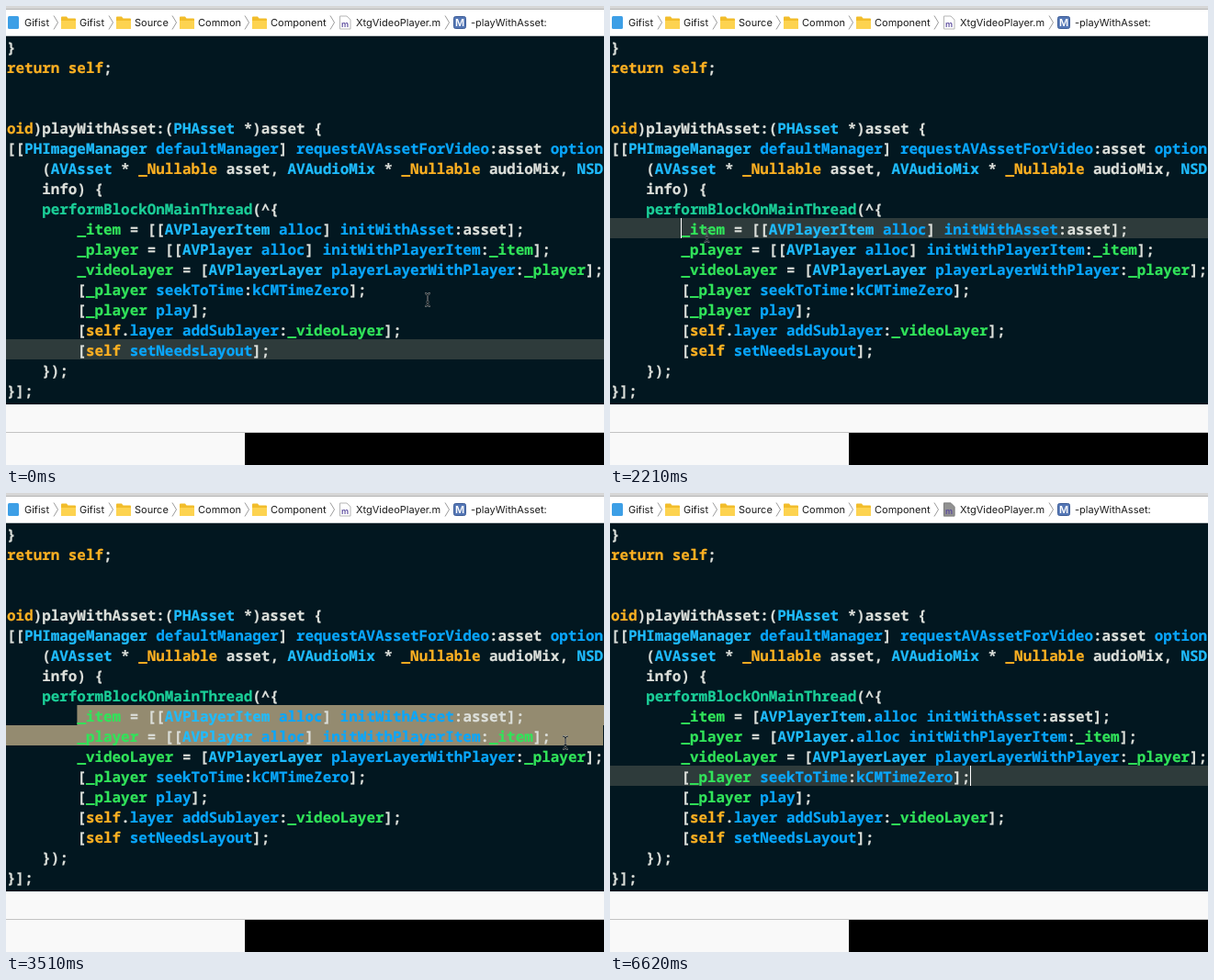
Animation, 651 px wide and 500 px high, one loop 7.07 s. Source, as an HTML page:

```html
<!DOCTYPE html>
<html lang="en">
<head>
<meta charset="utf-8">
<title>Code editor</title>
<style>
  html, body { margin: 0; width: 100%; height: 100%; overflow: hidden; background: #021720; }
  svg { display: block; width: 651px; height: 500px; }
  text { white-space: pre; text-rendering: geometricPrecision; }
  #code text { font: 600 15.917px "Noto Sans Mono", "DejaVu Sans Mono", monospace; stroke-width: .2px; }
  #path text { font: 11px Inter, "Liberation Sans", sans-serif; fill: #1c1c1c; }
  #path .glyph { font-weight: 600; text-anchor: middle; }
  .plain { fill: #dcdfda; stroke: #dcdfda; }
  .key { fill: #fdb022; stroke: #fdb022; }
  .type { fill: #1fbcff; stroke: #1fbcff; }
  .call { fill: #09a7fe; stroke: #09a7fe; }
  .ivar { fill: #31e45a; stroke: #31e45a; }
  .func { fill: #1bcf98; stroke: #1bcf98; }
</style>
</head>
<body>
<svg viewBox="0 0 651 500" xmlns="http://www.w3.org/2000/svg">
  <defs>
    <g id="folder">
      <path d="M0 13V1.5Q0 .5 1 .5H6L7.5 2.5H15Q16 2.5 16 3.5V13Q16 14 15 14H1Q0 14 0 13Z" fill="#f2bd2b"/>
      <path d="M0 5H16V13Q16 14 15 14H1Q0 14 0 13Z" fill="#fdd350"/>
    </g>
    <path id="chevron" d="M0 0L4.500 7.500L0 15" fill="none" stroke="#9b9b9b"/>
    <path id="sheet" d="M.5 .5H8L12 4.500V14.500H.5Z"/>
    <path id="beam" d="M-3 -7Q0 -7 0 -4.500Q0 -7 3 -7M0 -4.500V4.500M-3 7Q0 7 0 4.500Q0 7 3 7M-1.500 2.500H1.500" fill="none"/>
  </defs>

  <rect width="651" height="500" fill="#021720"/>
  <rect id="row" width="651" height="22" fill="#2e3b3b"/>
  <g id="selection" fill="#948b70"></g>
  <g id="code"></g>
  <rect id="caret" width="1" height="22" fill="#fff"/>

  <g id="path">
    <rect width="651" height="33" fill="#fff"/>
    <rect width="651" height="3" fill="#d6d6d6"/>
    <rect y="3" width="651" height="1" fill="#b4b4b4"/>
    <rect y="32" width="651" height="1" fill="#c4c8ca"/>
    <rect x="2" y="11" width="12" height="14" rx="1.500" fill="#3d9fe6"/>
    <use href="#sheet" x="363" y="10.500" fill="#fff" stroke="#b5b5b5"/>
    <use id="dim" href="#sheet" x="363" y="10.500" fill="#929292" stroke="#7d7d7d"/>
    <text class="glyph" x="369" y="22.500" style="fill:#5a4a9c;font-size:9px">m</text>
    <rect x="487.500" y="11.500" width="13" height="13" rx="2" fill="#5577b5" stroke="#3c5c98"/>
    <text class="glyph" x="494" y="22" style="fill:#fff">M</text>
  </g>

  <rect y="434" width="651" height="31" fill="#f9f9f9"/>
  <rect y="464" width="651" height="1" fill="#c3c3c3"/>
  <rect y="465" width="260" height="35" fill="#f9f9f9"/>
  <rect x="260" y="465" width="391" height="35" fill="#000"/>

  <g id="mouse">
    <use href="#beam" stroke="#b4baba" stroke-width="1.800" opacity=".8"/>
    <use href="#beam" stroke="#0a0f12" stroke-width=".9"/>
  </g>
</svg>
<script>
const LOOP = 7070, WIDTH = 651, COL = 9.55, ROW = 22, LEFT = 1, TOP = 33;
const $ = id => document.getElementById(id);
const rowY = row => TOP + row * ROW;
const colX = col => LEFT + col * COL;

function add(parent, tag, attrs, text = '') {
  const el = document.createElementNS('http://www.w3.org/2000/svg', tag);
  for (const k in attrs) el.setAttribute(k, attrs[k]);
  el.textContent = text;
  return parent.appendChild(el);
}

// Syntax colouring
const PLAIN = /^(playWithAsset|asset|audioMix|info)$/;
function kind(word) {
  if (/^(oid|return|self|_Nullable)$/.test(word)) return 'key';
  if (/^_/.test(word)) return 'ivar';
  if (/^(PH|AV|NS)/.test(word)) return 'type';
  if (/^perform/.test(word)) return 'func';
  return PLAIN.test(word) || !/\w/.test(word) ? 'plain' : 'call';
}

// Words after "limit" characters stay uncoloured
function line(row, indent, code, limit = Infinity) {
  const text = add($('code'), 'text', { x: colX(indent), y: rowY(row) + 18 });
  for (const m of code.matchAll(/\w+|\W+/g))
    add(text, 'tspan', { class: m.index < limit ? kind(m[0]) : 'plain' }, m[0]);
  return text;
}

// Holds each value until the next time in ms
function play(el, prop, steps) {
  const frames = steps.map(([t, v]) => ({ offset: t / LOOP, [prop]: v, easing: 'step-end' }));
  frames.push({ offset: 1, [prop]: steps.at(-1)[1] });
  el.animate(frames, { duration: LOOP, iterations: Infinity });
}
const move = (el, steps) =>
  play(el, 'transform', steps.map(([t, x = -50, y = -50]) => [t, `translate(${x}px, ${y}px)`]));
const show = (el, from, to) =>
  play(el, 'opacity', [...(from ? [[0, 0]] : []), [from, 1], ...(to < LOOP ? [[to, 0]] : [])]);

// Breadcrumbs
[['Gifist', 20], ['Gifist', 80], ['Source', 140], ['Common', 209],
 ['Component', 288], ['XtgVideoPlayer.m', 381], ['-playWithAsset:', 506]]
  .forEach(([name, x], i) => {
    add($('path'), 'text', { x, y: 22 }, name);
    if (i) add($('path'), 'use', { href: '#chevron', x: x - 28, y: 10.5 });
    if (i > 0 && i < 5) add($('path'), 'use', { href: '#folder', x: x - 20, y: 11 });
  });

line(0, 0, '}');
line(1, 0, 'return self;');
line(4, 0, 'oid)playWithAsset:(PHAsset *)asset {');
line(5, 0, '[[PHImageManager defaultManager] requestAVAssetForVideo:asset option');
line(6, 4, '(AVAsset * _Nullable asset, AVAudioMix * _Nullable audioMix, NSD');
line(7, 4, 'info) {');
line(8, 4, 'performBlockOnMainThread(^{');
line(11, 8, '_videoLayer = [AVPlayerLayer playerLayerWithPlayer:_player];');
line(12, 8, '[_player seekToTime:kCMTimeZero];');
line(13, 8, '[_player play];');
line(14, 8, '[self.layer addSublayer:_videoLayer];');
line(15, 8, '[self setNeedsLayout];');
line(16, 4, '});');
line(17, 0, '}];');

// The two lines that get rewritten, then recoloured
const EDIT = 4770, RECOLOUR = 5920;
[[9, '_item', 'AVPlayerItem', 'initWithAsset:asset'],
 [10, '_player', 'AVPlayer', 'initWithPlayerItem:_item']].forEach(([row, name, type, init]) => {
  const after = `${name} = [${type}.alloc ${init}];`;
  show(line(row, 8, `${name} = [[${type} alloc] ${init}];`), 0, EDIT);
  show(line(row, 8, after, name.length), EDIT, RECOLOUR);
  show(line(row, 8, after), RECOLOUR, LOOP);
});
show($('dim'), 4860, LOOP);

// Mouse path: each glide adds n poses between two times
const linear = u => u;
const speedUp = u => u ** 2.25;
const slowDown = u => 1 - (1 - u) ** 2.25;
const smooth = u => u * u * (3 - 2 * u);
const poses = [[0, 459, 320]];
function glide(from, to, n, x, y, ease) {
  const [, x0, y0] = poses.at(-1);
  for (let i = 0; i < n; i++) {
    const t = Math.floor((from + (to - from) * i / (n - 1)) / 10) * 10, k = ease((i + 1) / n);
    poses.push([t, x0 + (x - x0) * k, y0 + (y - y0) * k]);
  }
}
const DRAG = 2210, DROP = 3510;
glide(440, 530, 2, 229, 276, linear);
glide(970, 1060, 2, 111, 259, linear);
glide(1240, 1850, 8, 72, 247, slowDown);
glide(DRAG, 2380, 3, 468, 283, speedUp);
glide(2470, 2900, 6, 611, 284, slowDown);
glide(2980, DROP, 7, 609, 272, linear);
glide(5120, 5380, 4, 483, 312, smooth);
glide(6190, 6540, 5, 620, 489, smooth);
move($('mouse'), [...poses, [6620]]);

// The selection follows the mouse one pose late; past the line end it fills the row
[[9, 8, 61], [10, 0, 62], [11, 0, 68]].forEach(([row, start, end]) => {
  const steps = [[0, '0px']];
  poses.forEach(([t], i) => {
    if (t < DRAG || t > DROP) return;
    const [, x, y] = poses[i - 1];
    const at = Math.floor((y - TOP) / ROW), col = Math.round((x - LEFT) / COL);
    const right = at < row ? 0 : at > row || col > end ? WIDTH : colX(col);
    steps.push([t, Math.max(0, right - colX(start)) + 'px']);
  });
  const x = start ? colX(start) : 0;
  play(add($('selection'), 'rect', { x, y: rowY(row), height: ROW }), 'width', [...steps, [EDIT, '0px']]);
});

// Current line and text caret
const at = (t, row, col) => [t, Math.floor(colX(col)), rowY(row)];
move($('row'), [[0, 0, rowY(15)], [1940, 0, rowY(9)], [2290], [EDIT, 0, rowY(9)], [5380, 0, rowY(12)]]);
move($('caret'), [[0], at(170, 15, 30), [800], at(1240, 15, 30), [1850], at(1940, 9, 8),
  [2290], at(EDIT, 9, 8), at(5380, 12, 41), [6100], at(6620, 12, 41)]);
</script>
</body>
</html>
```
